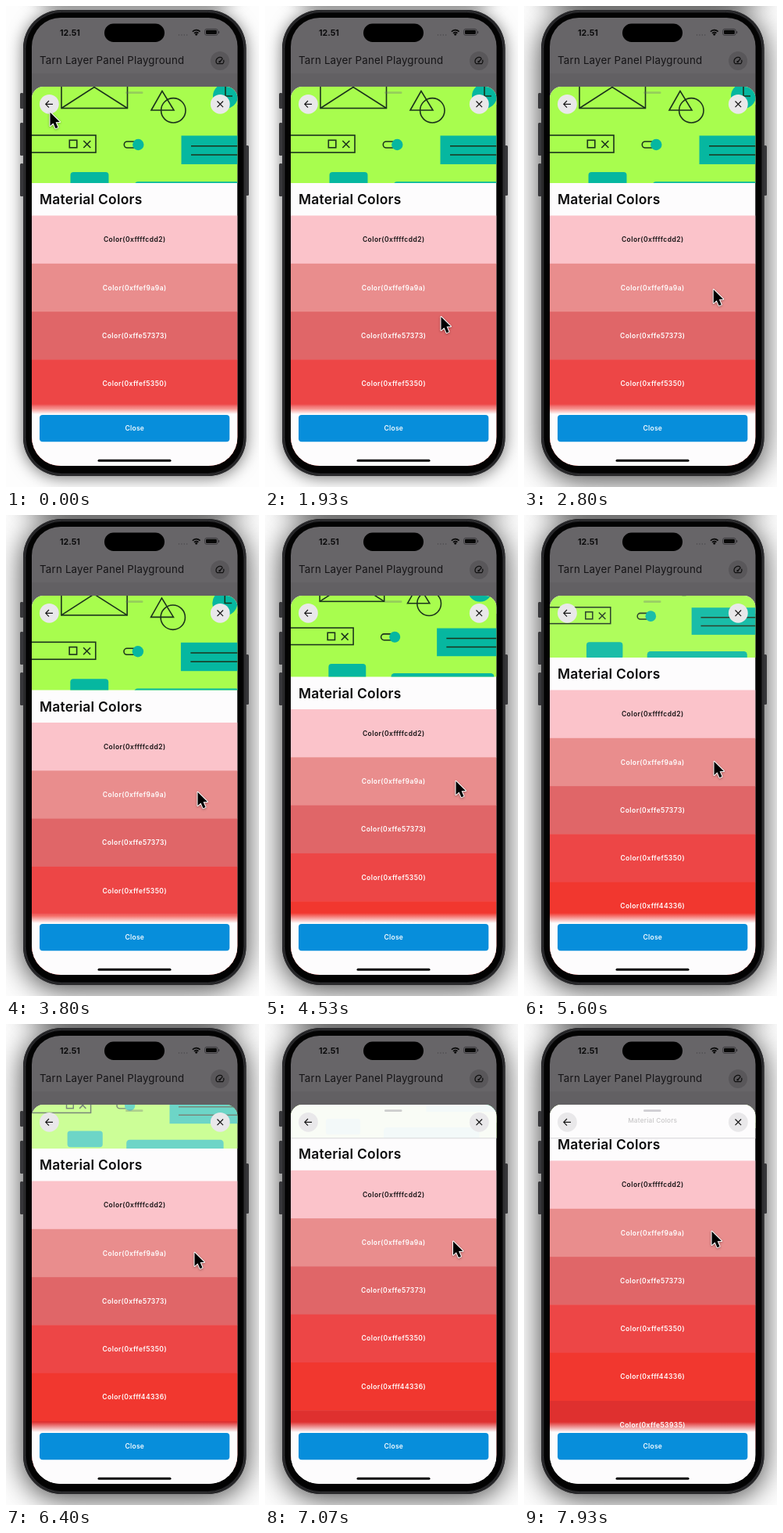
Recreate the animation shown at these times as an HTML page with a canvas. Size 324 by 614 pixels, loop 8 s.

```html
<!DOCTYPE html>
<html lang="en">
<head>
<meta charset="utf-8">
<title>Modal sheet scroll</title>
<style>
html, body { margin: 0; width: 100%; height: 100%; overflow: hidden; background: #fdfdfd; }
canvas { display: block; width: 324px; height: 614px; }
</style>
</head>
<body>
<canvas id="stage"></canvas>
<script>
const W = 324, H = 614, LOOP = 8000;
const canvas = document.getElementById('stage');
const ctx = canvas.getContext('2d');
const dpr = window.devicePixelRatio || 1;
canvas.width = W * dpr;
canvas.height = H * dpr;

const FONT = 'Inter, Roboto, sans-serif';
const INK = '#1b331c', TEAL = '#06b7a0', GREEN = '#a8fd4e', PAPER = '#fdfcfd';
const TOP = 103, ROW = 61.3;

const rows = [
  ['0xffffcdd2', '#fbc3ca'],
  ['0xffef9a9a', '#e98d8d'],
  ['0xffe57373', '#e06668'],
  ['0xffef5350', '#ed4646'],
  ['0xfff44336', '#f1372f'],
  ['0xffe53935', '#df302f'],
];

// [time, value] keys
const scrollKeys = [[0, 0], [3350, 0], [3800, 2.5], [4530, 19.5], [5600, 44], [6400, 67], [7930, 93], [8000, 93.4]];
const xKeys = [[0, 57], [250, 57], [1000, 150], [1750, 226], [2150, 226], [3000, 246], [3800, 246], [4530, 245], [5600, 244], [6400, 242], [8000, 241]];
const yKeys = [[0, 135], [250, 135], [1000, 285], [1750, 396], [2150, 396], [3000, 355], [3800, 353], [4530, 339], [5600, 314], [6400, 291], [7930, 264], [8000, 263.6]];

const clamp = v => Math.max(0, Math.min(1, v));

// Monotone cubic interpolation through the keys
function track(keys, t) {
  const slope = i => (keys[i + 1][1] - keys[i][1]) / (keys[i + 1][0] - keys[i][0]);
  const tangent = i => {
    if (i === 0) return slope(0);
    if (i === keys.length - 1) return slope(i - 1);
    const a = slope(i - 1), b = slope(i);
    return a * b <= 0 ? 0 : 2 * a * b / (a + b);
  };
  let i = 0;
  while (i < keys.length - 2 && t > keys[i + 1][0]) i++;
  const [t0, v0] = keys[i], [t1, v1] = keys[i + 1];
  const d = t1 - t0, u = clamp((t - t0) / d), w = 1 - u;
  return v0 * w * w * (1 + 2 * u) + v1 * u * u * (3 - 2 * u)
    + d * u * w * (w * tangent(i) - u * tangent(i + 1));
}

function rect(x, y, w, h, color) {
  ctx.fillStyle = color;
  ctx.fillRect(x, y, w, h);
}

function round(x, y, w, h, r, color) {
  ctx.beginPath();
  ctx.roundRect(x, y, w, h, r);
  if (color) {
    ctx.fillStyle = color;
    ctx.fill();
  }
}

function disc(x, y, r, color) {
  ctx.beginPath();
  ctx.arc(x, y, r, 0, 7);
  ctx.fillStyle = color;
  ctx.fill();
}

function ring(x, y, r, from = 0, to = Math.PI * 2) {
  ctx.beginPath();
  ctx.arc(x, y, r, from, to);
  ctx.stroke();
}

function pen(color, width) {
  ctx.strokeStyle = color;
  ctx.lineWidth = width;
}

function line(...p) {
  ctx.beginPath();
  for (let i = 0; i < p.length; i += 2) ctx.lineTo(p[i], p[i + 1]);
  ctx.stroke();
}

function label(str, x, y, weight, size, color, spacing = 0, align = 'center') {
  ctx.font = `${weight} ${size}px ${FONT}`;
  ctx.letterSpacing = spacing + 'px';
  ctx.textAlign = align;
  ctx.textBaseline = 'alphabetic';
  ctx.fillStyle = color;
  ctx.fillText(str, x, y);
}

function fade(y0, y1, from, to) {
  const g = ctx.createLinearGradient(0, y0, 0, y1);
  g.addColorStop(0, from);
  g.addColorStop(1, to);
  return g;
}

function drawPhone(deep) {
  rect(0, 0, W, H, '#fdfdfd');
  ctx.save();
  ctx.shadowColor = deep ? 'rgba(0,0,0,.75)' : 'rgba(0,0,0,.55)';
  ctx.shadowBlur = (deep ? 36 : 20) * dpr;
  ctx.shadowOffsetY = (deep ? 5 : 2) * dpr;
  // The upper body lies off stage; only its shadow shows
  for (const y of [-597, 5]) round(22, y, 285.5, 595, 49, '#222');
  ctx.restore();
  for (const [x, y, h] of [[18, 111, 20], [18, 149, 42], [18, 201, 42], [306.5, 178, 64]])
    round(x, y, 4.5, h, 1.5, '#37373a');
  round(22, 5, 285.5, 595, 49, '#2e2e31');
  round(23.5, 6.5, 282.5, 592, 47.5, '#111113');
  pen('#444447', 0.8);
  round(24.3, 7.3, 281, 590.4, 47);
  ctx.stroke();
  round(26, 9, 277.5, 587, 45, '#030303');
}

function drawAppBar() {
  rect(33, 15, 264, 71, '#676568');
  rect(33, 86, 264, 40, '#626063');
  label('12.51', 69, 37.7, 700, 10.6, '#0c0c0d', 0, 'left');
  round(126, 22.5, 77, 23.5, 12, '#000');
  for (let i = 0; i < 4; i++) disc(221.5 + i * 3.4, 37, 0.7, '#48464a');

  pen('#080808', 1.7);
  for (const r of [3.6, 6.6]) ring(243.7, 37.3, r, -Math.PI * 0.76, -Math.PI * 0.24);
  disc(243.7, 36.3, 1.4, '#080808');
  pen('#333235', 0.8);
  round(254.6, 29.4, 16.6, 8, 2.4);
  ctx.stroke();
  round(256, 30.7, 13.8, 5.4, 1.3, '#080808');
  round(272, 32, 1.2, 3, 0.6, '#333235');

  label('Tarn Layer Panel Playground', 43, 74.2, 400, 13.3, '#151416', 0.2, 'left');
  disc(274, 70, 12, '#59575a');
  pen('#111', 1.3);
  ring(274, 70.5, 5, Math.PI * 0.8, Math.PI * 1.72);
  ring(274, 70.5, 5, -Math.PI * 0.12, Math.PI * 0.2);
  line(270, 73.7, 278, 73.7);
  line(273.6, 71.3, 277.5, 67.3);
  disc(273.6, 71.3, 1.2, '#111');
}

function drawArt() {
  pen(INK, 1.6);
  ctx.strokeRect(71, 76, 84.5, 54.5);
  line(71, 130.5, 113, 103.5, 155.5, 130.5);
  line(200, 108.5, 186, 133, 215, 133, 200, 108.5, 186, 133);
  ring(214.3, 133.3, 15.7);

  disc(281, 115, 16, TEAL);
  line(281, 103, 281, 115, 290, 115);

  ctx.strokeRect(10, 165, 105, 22);
  ctx.strokeRect(81.3, 171.3, 9.5, 9.5);
  line(99.3, 172, 108.3, 181);
  line(108.3, 172, 99.3, 181);

  round(151.3, 173, 20, 8, 4);
  ctx.stroke();
  disc(169.3, 177, 7.2, TEAL);

  rect(224.5, 165.5, 110, 36.5, TEAL);
  line(237, 178.7, 340, 178.7);
  line(237, 190, 340, 190);

  round(82.5, 212, 49, 22.5, 4, TEAL);
  round(164.5, 224.3, 135, 30, 4.5, TEAL);
}

function drawHero(s) {
  const zoom = 1 - s * 0.00117;
  ctx.save();
  ctx.beginPath();
  ctx.rect(33, TOP, 264, Math.max(0, 226 - s - TOP));
  ctx.clip();
  rect(33, TOP, 264, 130, GREEN);
  ctx.save();
  ctx.translate(33, TOP - s);
  ctx.scale(zoom, zoom);
  ctx.translate(-33, -TOP);
  drawArt();
  ctx.restore();
  rect(33, TOP, 264, 130, `rgba(255,255,255,${clamp((s - 38.5) / 69)})`);
  ctx.restore();
}

function drawList(s) {
  label('Material Colors', 43, 253.2 - s, 600, 17.4, '#0b0b0c', 0.25, 'left');
  rows.forEach(([code, color], i) => {
    const y = 267.5 - s + i * ROW;
    rect(33, y, 264, ROW + 0.5, color);
    label(`Color(${code})`, 164.7, y + 33.8, 600, 8.5, i ? '#fff' : '#141213', 0.45);
  });
}

function drawTopBar(s) {
  const shown = clamp((s - 70) / 12);
  if (shown > 0) {
    ctx.globalAlpha = shown;
    rect(33, TOP, 264, 43, PAPER);
    rect(33, 145.3, 264, 1, '#d4d3d6');
    ctx.globalAlpha = clamp((s - 84) / 40);
    label('Material Colors', 164.7, 125.8, 500, 8.2, '#111', 0.25);
    ctx.globalAlpha = 1;
  }
  round(153, 109.3, 22.5, 2.7, 1.4, 'rgba(110,105,120,.32)');
  disc(55.4, 125.3, 12.4, '#e9e8ea');
  disc(274.3, 125.3, 12.4, '#e9e8ea');
  pen('#161616', 1.2);
  line(60, 125.3, 51, 125.3);
  line(55, 121, 50.8, 125.3, 55, 129.6);
  line(270.5, 121.5, 278.1, 129.1);
  line(278.1, 121.5, 270.5, 129.1);
}

function drawFooter() {
  rect(33, 508, 264, 13, fade(508, 521, 'rgba(253,252,253,0)', PAPER));
  rect(33, 521, 264, 70, PAPER);
  round(43, 522, 243.3, 34.3, 4, '#078edb');
  label('Close', 164.8, 542.1, 600, 8.5, '#f4fbff', 0.2);
  round(117.5, 578.7, 94, 3, 1.5, '#080808');
}

function drawCursor(x, y) {
  ctx.save();
  ctx.translate(x, y);
  ctx.beginPath();
  for (const [px, py] of [[0, 0], [0, 17.2], [4, 13.6], [7, 20.4], [10, 19.1], [7.1, 12.4], [12.4, 12.2]])
    ctx.lineTo(px, py);
  ctx.closePath();
  ctx.lineJoin = 'round';
  pen('#fff', 2);
  ctx.shadowColor = 'rgba(0,0,0,.35)';
  ctx.shadowBlur = 3 * dpr;
  ctx.shadowOffsetY = dpr;
  ctx.stroke();
  ctx.shadowColor = 'transparent';
  ctx.fillStyle = '#000';
  ctx.fill();
  ctx.restore();
}

function draw(t) {
  const s = track(scrollKeys, t);
  ctx.setTransform(dpr, 0, 0, dpr, 0, 0);
  drawPhone(t >= 2600);

  ctx.save();
  round(33, 15, 263.5, 572, 37);
  ctx.clip();
  drawAppBar();
  round(33, TOP, 263.5, 500, [15, 15, 0, 0]);
  ctx.clip();
  rect(33, TOP, 264, 490, PAPER);
  drawHero(s);
  drawList(s);
  drawTopBar(s);
  drawFooter();
  ctx.restore();

  drawCursor(track(xKeys, t) - 0.5, track(yKeys, t) + 0.8);
}

function tick() {
  draw(performance.now() % LOOP);
  requestAnimationFrame(tick);
}
tick();
</script>
</body>
</html>
```
